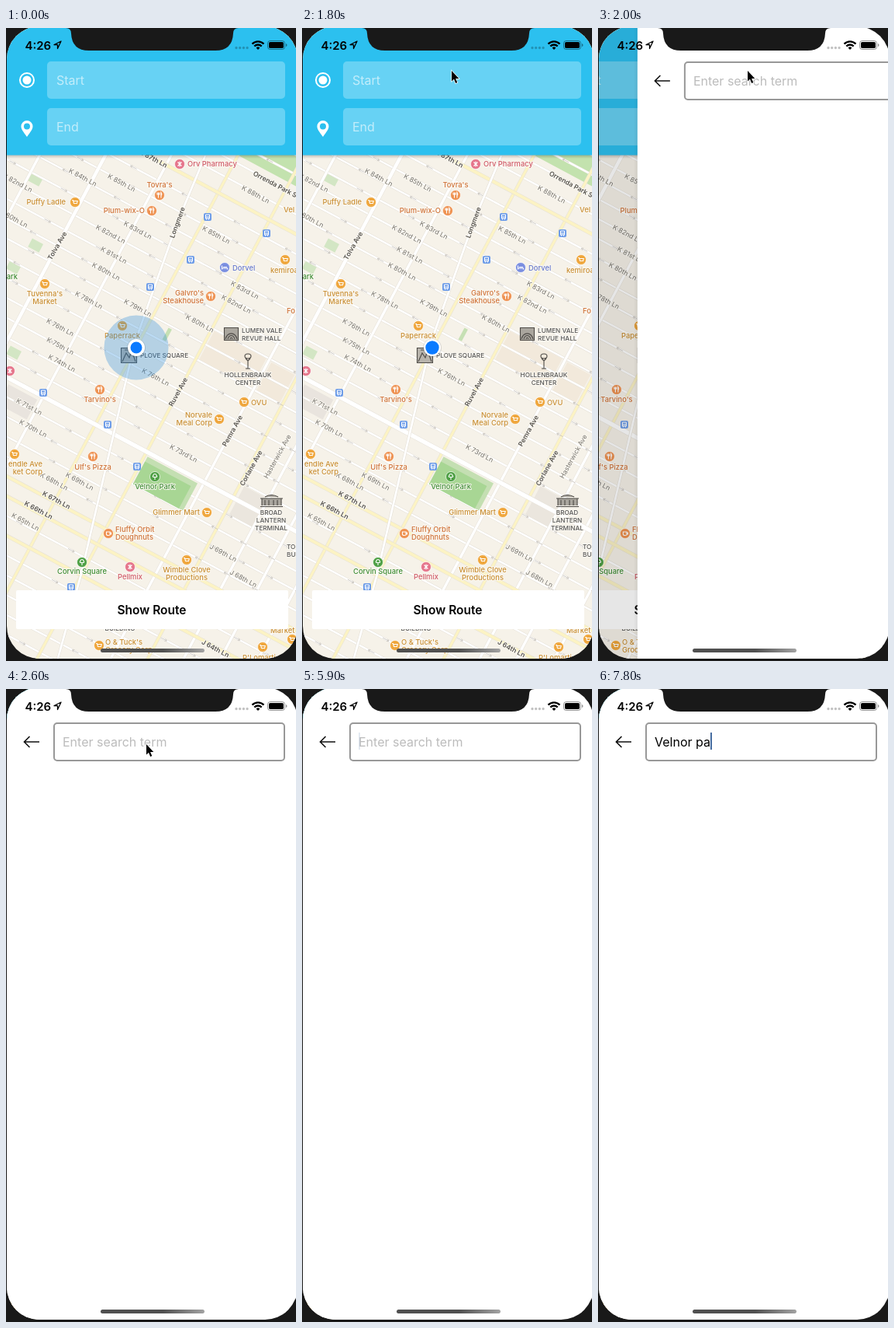
These frames come from a looping animation (374x814 px, 8 s). An HTML page:

```html
<!DOCTYPE html>
<html lang="en">
<head>
<meta charset="utf-8">
<title>Route search</title>
<style>
html, body { margin: 0; width: 100%; height: 100%; overflow: hidden; background: #191919; }
svg { display: block; width: 100%; height: 100%; }
text { font: 16px Inter, sans-serif; white-space: pre; }
.map text { font-size: 9.4px; font-weight: 500; paint-order: stroke; stroke: #fbf8f1; stroke-width: 2px; stroke-linejoin: round; }
.map text.road { font-size: 8.6px; font-weight: 400; fill: #75726c; }
.map text.main { font-weight: 600; fill: #56534e; }
.map text.sight { font-size: 8.2px; fill: #555; }
</style>
</head>
<body>
<svg viewBox="0 0 374 814">
  <defs>
    <clipPath id="screen"><rect x="1" y="-2" width="375" height="813" rx="42"/></clipPath>
    <linearGradient id="bar"><stop offset=".6" stop-color="#505050"/><stop offset="1" stop-color="#a2a2a2"/></linearGradient>
    <linearGradient id="under" x2="0" y2="1"><stop stop-opacity=".22"/><stop offset="1" stop-opacity="0"/></linearGradient>
    <linearGradient id="edge"><stop stop-opacity="0"/><stop offset="1" stop-opacity=".06"/></linearGradient>
  </defs>
  <g clip-path="url(#screen)">
    <g id="home">
      <rect width="376" height="814" fill="#f6f2e9"/>
      <g id="map" class="map"></g>
      <circle id="halo" cx="168" cy="411" fill="#2488d8"/>
      <circle cx="168" cy="411.5" r="12" opacity=".12"/>
      <circle cx="168" cy="411" r="11" fill="#fff"/>
      <circle id="dot" cx="168" cy="411" fill="#0a7aff"/>
      <rect y="163" width="376" height="5" fill="url(#under)"/>
      <rect width="376" height="163.5" fill="#2cc0ef"/>
      <g fill="#fff">
        <rect x="53" y="43" width="307" height="48" rx="5" opacity=".28"/>
        <rect x="53" y="103" width="307" height="48" rx="5" opacity=".28"/>
        <text x="65" y="72.5" opacity=".6">Start</text>
        <text x="65" y="132.5" opacity=".6">End</text>
        <circle cx="27" cy="67" r="9" fill="none" stroke="#fff" stroke-width="2"/>
        <circle cx="27" cy="67" r="5.5"/>
        <path fill-rule="evenodd" d="M27 140C22 133 19.500 130 19.500 126.500a7.500 7.500 0 0 1 15 0C34.500 130 32 133 27 140ZM31 126.500a4 4 0 1 0-8 0a4 4 0 1 0 8 0Z"/>
        <rect x="13" y="723" width="351" height="50" rx="2"/>
      </g>
      <text x="188" y="753.5" text-anchor="middle" style="font-size:15.5px;font-weight:600">Show Route</text>
    </g>
    <rect id="shade" width="376" height="814"/>
    <g id="panel">
      <rect x="-4" width="5" height="814" fill="url(#edge)"/>
      <rect x="1" width="376" height="814" fill="#fff"/>
      <path d="M43 68H24M30.500 61L23.500 68L30.500 75" fill="none" stroke="#111" stroke-width="1.6"/>
      <rect x="62" y="44" width="297" height="48" rx="4" fill="none" stroke="#989898" stroke-width="2"/>
      <text id="hint" x="73" y="73.5" fill="#bcbcbc">Enter search term</text>
      <text id="typed" x="73" y="73.5"></text>
      <rect id="caret" y="56" width="2" height="22" fill="#426a9f"/>
    </g>
    <text x="24.5" y="27.5" style="font-size:15px;font-weight:600">4:26</text>
    <path d="M62 21.500L71 17L66.500 26.500V21.500Z" fill="none" stroke="#000" stroke-width="1.3" stroke-linejoin="round"/>
    <path d="M297 25.500h15" stroke="#000" stroke-opacity=".24" stroke-width="3.4" stroke-linecap="round" stroke-dasharray="0 4.7"/>
    <g fill="none" stroke="#000" stroke-width="2.4">
      <path d="M317.500 20.500a10.500 10.500 0 0 1 15 0M320.300 23.500a6.500 6.500 0 0 1 9.400 0"/>
      <path d="M325 28l-2.400-2.500a3.400 3.400 0 0 1 4.800 0Z" fill="#000" stroke="none"/>
    </g>
    <rect x="337.5" y="16.5" width="22" height="11" rx="3.2" fill="none" stroke="#000" stroke-opacity=".42"/>
    <rect x="339" y="18" width="19" height="8" rx="1.8"/>
    <path d="M361 20v4q1.500-.5 1.500-2t-1.500-2" fill="#000" opacity=".45"/>
    <rect x="122" y="798" width="134" height="5" rx="2.5" fill="url(#bar)"/>
  </g>
  <path d="M77 0Q84 0 84 7Q85 29 107 29H270Q292 29 293 7Q293 0 300 0Z" fill="#191919"/>
  <path id="cursor" d="M0 0V13.500L3 10.700L5.200 16L7.300 15.100L5.100 10H9.300Z" stroke="#fff" stroke-width="1.4" paint-order="stroke"/>
</svg>
<script>
const $ = id => document.getElementById(id);
const map = $('map');

function add(parent, tag, attrs, text) {
  const node = document.createElementNS('http://www.w3.org/2000/svg', tag);
  for (const key in attrs) node.setAttribute(key, attrs[key]);
  if (text) node.textContent = text;
  parent.append(node);
  return node;
}

// Inside the tilted grid, x runs across the avenues and y across the streets.
const grid = add(map, 'g', { transform: 'rotate(28)' });
const streetY = n => 126 + 22.5 * (54 - n);
const avenues = [40, 115, 190, 265, 341, 416, 500, 542, 583, 625, 668];
const block = (x, y, width, height, fill) => add(grid, 'rect', { x, y, width, height, fill });

block(-100, -200, 900, 204, '#c3e2ae');
block(218, 403, 42, 29, '#e9e4de');
block(420, 218, 76, 42, '#f2e9db');
block(504, 219, 34, 44, '#f2e9db');
block(548, 376, 33, 42, '#ebe6de');
[[125, 154], [165, 229], [153, 267], [205, 364]].forEach(([x, y]) => block(x - 8, y - 6, 16, 12, '#d3e6c4'));
block(366, 242, 5, 17, '#c6e0b4');

function road(d, width, color = '#fff') {
  add(grid, 'path', { d, fill: 'none', stroke: '#e5e0d7', 'stroke-width': width + 1 });
  add(grid, 'path', { d, fill: 'none', stroke: color, 'stroke-width': width });
}
const yellow = '#fcf3c4';
const busy = [34, 36, 37, 57];
let arrows = '';
for (let n = 62; n > 22; n--) {
  const y = streetY(n);
  if (n !== 42 && !busy.includes(n)) {
    road(`M-50 ${y}H800`, 2.4);
    const dir = n % 2 ? 1 : -1;
    for (const u of avenues) arrows += `M${u + 44} ${y}h${9 * dir}l${-2.5 * dir} -1.5m${2.5 * dir} 1.5l${-2.5 * dir} 1.5`;
  }
}
avenues.forEach((u, i) => road(`M${u} -100V850`, i === 2 ? 4.5 : 3.4, [4, 5, 7].includes(i) ? yellow : '#fff'));
busy.forEach(n => road(`M-50 ${streetY(n)}H800`, 4, yellow));
road(`M-50 ${streetY(42)}H800`, 5.5);
add(grid, 'path', { d: arrows, fill: 'none', stroke: '#c9c5be', 'stroke-width': .8 });
block(420, 401, 73, 40, '#c4dfb2');
block(420, 408, 67, 33, '#a8d694');
const diagonal = { d: 'M257 164L221 250L166 405L130 560L97 702L66 814', fill: 'none' };
add(map, 'path', { ...diagonal, stroke: '#e2ddd3', 'stroke-width': 3.8 });
add(map, 'path', { ...diagonal, stroke: '#fff', 'stroke-width': 2.8 });

function roadName(name, x, y, angle, kind = '') {
  add(map, 'text', { class: 'road ' + kind, 'text-anchor': 'middle', transform: `translate(${x} ${y}) rotate(${angle}) translate(0 3)` }, name);
}
const ordinal = n => n + (['', 'st', 'nd', 'rd'][n % 10] || 'th');
const streetName = (n, x, y, side = 'K', kind) => roadName(`${side} ${ordinal(n)} Ln`, x, y, 28, kind);
[[85, 149, 199], [84, 99, 192], [82, 15, 199], [83, 170, 260], [82, 135, 265], [81, 139, 292], [80, 129, 313],
 [80, 10, 245], [79, 170, 360], [78, 107, 350], [76, 70, 385], [75, 70, 409], [74, 72, 431], [76, 193, 449],
 [71, 30, 487], [70, 35, 515], [73, 229, 547], [69, 95, 583], [68, 62, 583], [65, 25, 635], [88, 322, 214],
 [85, 271, 266], [83, 308, 337], [82, 297, 355], [80, 250, 380]].forEach(([n, x, y]) => streetName(n, x, y));
[[67, 65, 607], [66, 42, 620], [87, 190, 168]].forEach(([n, x, y]) => streetName(n, x, y, 'K', 'main'));
[[69, 280, 675], [68, 306, 708]].forEach(([n, x, y]) => streetName(n, x, y, 'J'));
streetName(64, 270, 798, 'J', 'main');
roadName('Orrenda Park S', 347, 201, 28, 'main');
roadName('Tolva Ave', 66, 280, -60, 'main');
roadName('Longmere', 221, 250, -70, 'main');
roadName('Ruvel Ave', 222, 468, -61, 'main');
roadName('Pemra Ave', 292, 518, -61, 'main');
roadName('Corlane Ave', 316, 566, -61, 'main');
roadName('Hasterwick Ave', 350, 551, -61);

const glyphs = {
  food: 'M-1.5 -3.5V3.5M-3 -3.5V-1H0V-3.5M2 3.5V-3.5Q3.5 -1 2 .5',
  cart: 'M-3.8 -2.5H-2.5L-1.5 1.5H2.5L3.2 -1.5H-2M-1 3h.2M2 3h.2',
  tree: 'M0 4V0M-2 .5Q-3.5 -.5 -2 -1.5Q-2 -3.5 0 -3.5T2 -1.5Q3.5 -.5 2 .5Z',
  care: 'M-2.5 -2.5L2.5 2.5M-2.5 2.5L2.5 -2.5M0 -3.5V3.5',
  cup: 'M-2.5 -2V1Q-2.5 2.5 0 2.5T2 1V-2ZM2 -1H3.5V1H2',
  bed: 'M-3.5 -2.5V2.5M-3.5 1H3.5V2.5M-2 -.5H3'
};
const orange = '#ee9150', amber = '#efa63c', pink = '#e5748a', green = '#4ea044', violet = '#7b8fe0';
const ink = { [orange]: '#cf733a', [amber]: '#c98f35', [pink]: '#cf5a68', [green]: '#3f8d36', [violet]: '#6678cc' };

function label(lines, x, y, anchor, attrs) {
  lines.split('|').forEach((line, i) => add(map, 'text', { x, y: y + 3.4 + i * 9.6, 'text-anchor': anchor, ...attrs }, line));
}
function place(kind, color, x, y, lines = '', tx, ty, anchor = 'middle') {
  const pin = add(map, 'g', { transform: `translate(${x} ${y})` });
  add(pin, 'circle', { r: 6.5, fill: color, stroke: '#fff', 'stroke-opacity': .7 });
  add(pin, 'path', { d: glyphs[kind], fill: 'none', stroke: '#fff', 'stroke-width': 1.1 });
  label(lines, tx, ty, anchor, { fill: ink[color] });
}
place('care', pink, 224, 175, 'Orv Pharmacy', 234, 175, 'start');
place('food', orange, 198, 215, "Tovra's", 198, 202);
place('cart', amber, 89, 224, 'Puffy Ladle', 77, 224, 'end');
place('food', orange, 188, 235, 'Plum-wix-O', 179, 235, 'end');
place('bed', violet, 282, 308, 'Dorvel', 292, 309, 'start');
place('cart', amber, 360, 298, 'kemiroa', 341, 312, 'start');
place('cart', amber, 50, 329, "Tuvenna's|Market", 50, 342);
place('food', orange, 264, 345, "Galvro's|Steakhouse", 255, 341, 'end');
place('cart', amber, 150, 383, 'Paperrack', 150, 396);
place('food', orange, 121, 465, "Tarvino's", 121, 478);
place('cart', amber, 275, 503, 'Norvale|Meal Corp', 266, 498, 'end');
place('cart', amber, 307, 481, 'OVU', 316, 482, 'start');
place('food', orange, 112, 551, "Ulf's Pizza", 112, 565);
place('tree', green, 192, 577, 'Velnor Park', 192, 590);
place('cart', amber, 259, 623, 'Glimmer Mart', 250, 623, 'end');
place('cup', orange, 132, 650, 'Fluffy Orbit|Doughnuts', 141, 645, 'start');
place('tree', green, 98, 687, 'Corvin Square', 98, 699);
place('care', pink, 160, 693, 'Pellmix', 160, 706);
place('cart', amber, 233, 684, 'Wimble Clove|Productions', 233, 697);
place('cart', amber, 120, 794, "O & Tuck's|Grocery Corp", 128, 790, 'start');
place('cart', amber, 11, 548, 'endle Ave|ket Corp', 47, 561, 'end');
place('cart', amber, 331, 796, "P'Lomarti", 305, 810, 'start');
place('cart', amber, 369, 786, 'Market', 341, 775, 'start');
place('care', pink, 5, 441);
label('Vel', 358, 234, 'start', { fill: ink[amber] });
label('Fo', 362, 364, 'start', { fill: ink[orange] });
label('ark', 15, 320, 'end', { fill: ink[green] });

const sight = (lines, x, y, anchor) => label(lines, x, y, anchor, { class: 'sight' });
sight('PLOVE SQUARE', 173, 421, 'start');
sight('LUMEN VALE|REVUE HALL', 304, 389, 'start');
sight('HOLLENBRAUK|CENTER', 312, 446, 'middle');
sight('BROAD|LANTERN|TERMINAL', 342, 623, 'middle');
sight('BUILDING', 147, 772, 'middle');
sight('TO|BU', 362, 667, 'start');

// Landmark drawings
const sketch = (d, fill = 'none') => add(map, 'path', { d, fill, stroke: '#4d4a46', 'stroke-width': 1.1 });
sketch('M148.5 411.5h20v19h-20ZM150 429l5-11l4 6l3-9l5 14M153 414h10', '#b8b4ac');
sketch('M281.5 385.5h18v16h-18ZM283 400a8 11 0 0 1 15 0M286 400a5 8 0 0 1 9 0M289 400a2 5 0 0 1 3 0', '#aaa69e');
sketch('M312 438v-10M309 438h6M312 428l-3-3M308 422a4 3 0 1 1 8 0a4 3 0 1 1-8 0M312 428l3-3');
sketch('M328 615.5h29M330 614v-9h25v9M334 614v-7M339 614v-7M345 614v-7M350 614v-7M328 605h29M334 603q8-5 17 0', '#aaa69e');

[[260, 243], [336, 264], [238, 298], [186, 333], [48, 469], [131, 510], [169, 564], [84, 719]].forEach(([x, y]) => {
  const stop = add(map, 'g', { transform: `translate(${x} ${y})` });
  add(stop, 'rect', { x: -5, y: -5, width: 10, height: 10, rx: 2, fill: '#6d9ce8' });
  add(stop, 'path', { d: 'M-2.5 -3H2.5V2H-2.5ZM-2.5 0H2.5M-1.5 2V3.5M1.5 2V3.5', fill: 'none', stroke: '#fff' });
});

const clamp = x => Math.min(1, Math.max(0, x));
const ramp = (t, from, to) => clamp((t - from) / (to - from));

// Critically damped spring of the screen push
function pushed(t) {
  const x = Math.max(0, t - 1808) / 1000 * Math.sqrt(1000 / 3);
  return t > 2600 ? 1 : 1 - (1 + x) * Math.exp(-x);
}

const cursorPath = [[1000, 376, 16], [1200, 310, 34], [1400, 240, 48], [1700, 193, 55], [2200, 193, 55], [2500, 181, 71],
  [3300, 181, 71], [3400, 165, 73], [3500, 137, 75], [3600, 155, 73], [3700, 177, 70], [4000, 177, 70]];
function cursorAt(t) {
  const i = cursorPath.findIndex(key => key[0] > t);
  if (i < 1) return null;
  const [a, b] = [cursorPath[i - 1], cursorPath[i]];
  const k = ramp(t, a[0], b[0]);
  return [a[1] + (b[1] - a[1]) * k, a[2] + (b[2] - a[2]) * k];
}

const query = 'Velnor pa';
const keyTimes = [6000, 6200, 6400, 6600, 6700, 6900, 7100, 7500, 7700];
function caretAlpha(t) {
  if (t < 3900) return 0;
  if (t < 4300 || t >= keyTimes[0]) return 1;
  const phase = t % 1000;
  return phase > 700 ? ramp(phase, 875, 1050) : Math.min(ramp(phase, -125, 50), 1 - ramp(phase, 380, 600));
}

function draw(now) {
  const t = now % 8000;
  const p = pushed(t);
  $('home').setAttribute('transform', `translate(${-112 * p})`);
  $('shade').setAttribute('opacity', .115 * p);
  $('panel').setAttribute('transform', `translate(${374 * (1 - p) + (p ? 0 : 6)})`);

  const fade = ramp(t, 0, 1000);
  $('halo').setAttribute('r', 41.5 + 18 * fade * (2 - fade));
  $('halo').setAttribute('opacity', .31 * (1 - fade));
  $('dot').setAttribute('r', 8.1 - .6 * Math.cos(Math.PI * t / 1800));

  const text = query.slice(0, keyTimes.filter(k => k <= t).length);
  $('typed').textContent = text;
  $('hint').setAttribute('opacity', text ? 0 : 1);
  $('caret').setAttribute('x', 73 + (text ? $('typed').getComputedTextLength() : 0));
  $('caret').setAttribute('opacity', caretAlpha(t));

  const tip = cursorAt(t);
  $('cursor').setAttribute('visibility', tip ? 'visible' : 'hidden');
  if (tip) $('cursor').setAttribute('transform', `translate(${tip})`);
  requestAnimationFrame(draw);
}
requestAnimationFrame(draw);
</script>
</body>
</html>
```
